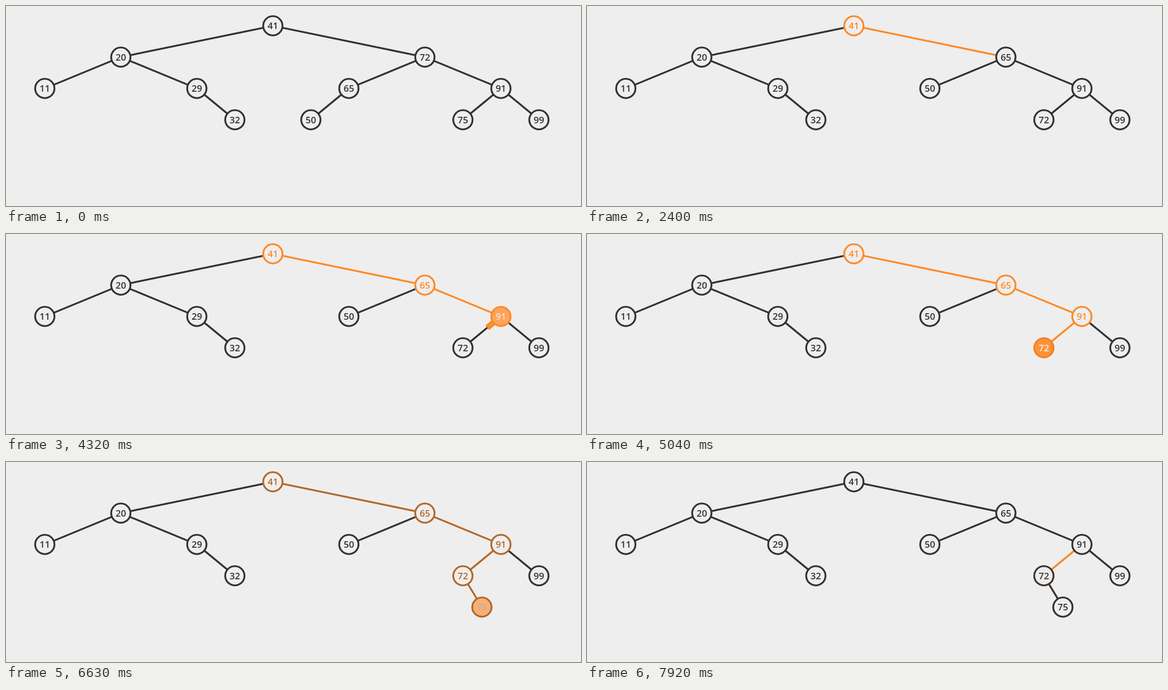
Animation of 1144x399 px, one loop 8000 ms. Source, as an HTML page:

```html
<!DOCTYPE html>
<html lang="en">
<head>
<meta charset="utf-8">
<title>Binary search tree insertion</title>
<style>
  html, body { margin: 0; width: 100%; height: 100%; overflow: hidden; background: #eee; }
  svg { display: block; width: 1144px; height: 399px; }
  text { font: 600 18.4px "Open Sans", "Noto Sans", sans-serif; text-anchor: middle; }
</style>
</head>
<body>
<svg id="stage" viewBox="0 0 1144 399"></svg>
<script>
const LOOP = 8000, SWAP = 840, STEP = 500, RESET = 6404, AGAIN = 6961, BACK = 7518;
const R = 19.2, CUT = 20, LINE = 3.7, THICK = 11.8;
const DARK = [51, 51, 51], ORANGE = [255, 138, 39], BG = [238, 238, 238], WHITE = [255, 255, 255];

const stage = document.getElementById('stage');
const clamp = v => Math.min(1, Math.max(0, v));
const ease = p => p < 0.5 ? 4 * p ** 3 : 1 - 4 * (1 - p) ** 3;
const mix = (a, b, k) => a.map((v, i) => v + (b[i] - v) * k);
const rgb = c => `rgb(${c.map(Math.round)})`;

function make(tag, attrs, parent) {
  const el = document.createElementNS('http://www.w3.org/2000/svg', tag);
  set(el, attrs);
  parent.appendChild(el);
  return el;
}

function set(el, attrs) {
  for (const k in attrs) el.setAttribute(k, attrs[k]);
}

// Eased colour changes, each given as [start, colour, duration]
function track(t, colour, steps) {
  for (const [at, to, dur = STEP] of steps) {
    const p = clamp((t - at) / dur);
    if (p > 0) colour = mix(colour, to, ease(p));
  }
  return rgb(colour);
}

// Nodes: key, column, level, parent key
const shared = [[41, 6, 0], [20, 2, 1, 41], [11, 0, 2, 20], [29, 4, 2, 20], [32, 5, 3, 29]];
const before = [...shared, [72, 10, 1, 41], [65, 8, 2, 72], [50, 7, 3, 65],
  [91, 12, 2, 72], [75, 11, 3, 91], [99, 13, 3, 91]];
const after = [...shared, [65, 10, 1, 41], [50, 8, 2, 65], [91, 12, 2, 65],
  [72, 11, 3, 91], [99, 13, 3, 91], [75, 11.5, 4, 72]];

// Visited nodes: when each lights up, and when the walk leaves it
const visits = {
  41: [1333, 1890], 65: [2448, 3005], 91: [3563, 4120], 72: [4678, 5300], 75: [5833, RESET]
};

function build(list) {
  const g = make('g', {}, stage);
  const lines = make('g', { fill: 'none' }, g), discs = make('g', {}, g);
  const nodes = {};
  for (const [key, col, level, up] of list) {
    const n = { key, x: 77.2 + 75.62 * col, y: 39.5 + 62.5 * level, up: nodes[up] };
    nodes[key] = n;
    if (n.up) {
      n.line = make('path', { stroke: rgb(DARK), 'stroke-width': LINE, d: span(n, 1, CUT) }, lines);
    }
    n.disc = make('circle', { cx: n.x, cy: n.y, r: R, fill: rgb(BG), stroke: rgb(DARK), 'stroke-width': 3.6 }, discs);
    n.label = make('text', { x: n.x, y: n.y + 6.5, fill: rgb(DARK) }, discs);
    n.label.textContent = key;
  }
  return { g, lines, nodes };
}

// Edge from the parent's rim, drawn up to share k, stopping `gap` short of the child's centre
function span(n, k, gap) {
  const { x, y } = n.up, dx = n.x - x, dy = n.y - y, len = Math.hypot(dx, dy);
  const a = CUT / len, b = a + (1 - gap / len - a) * k;
  return `M${x + dx * a} ${y + dy * a}L${x + dx * b} ${y + dy * b}`;
}

const first = build(before), second = build(after);
const pulse = make('path', { stroke: rgb(ORANGE), 'stroke-width': THICK }, second.lines);

function drawNode(n, t) {
  const [enter, leave] = visits[n.key];
  const ring = [[enter, ORANGE], [RESET, DARK]];
  const fill = [[enter, ORANGE], [leave, BG]];
  const text = [[enter, WHITE]];
  if (n.key !== 75) text.push([leave, ORANGE]);
  text.push([RESET, DARK]);
  if (n.key === 72) {
    ring.push([AGAIN, ORANGE], [BACK, DARK]);
    fill.push([AGAIN, ORANGE], [BACK, BG]);
    text.push([AGAIN, WHITE], [BACK, DARK]);
  }
  set(n.disc, { stroke: track(t, n.key === 75 ? ORANGE : DARK, ring), fill: track(t, BG, fill) });
  set(n.label, { fill: track(t, DARK, text) });
}

function drawEdge(n, t) {
  const start = visits[n.up.key][1], p = (t - start) / STEP;
  const steps = [[start + STEP, ORANGE, 1], [RESET, DARK]];
  if (n.key === 72) steps.push([BACK, ORANGE]);
  set(n.line, { stroke: track(t, DARK, steps) });
  if (p > 0 && p < 1) {
    set(pulse, { d: span(n, ease(p), n.key === 75 ? 0 : CUT), visibility: 'visible' });
  }
}

function drawNew(n, t) {
  const start = visits[72][1], grow = ease(clamp((t - visits[75][0]) / STEP));
  set(n.line, { d: span(n, 1, CUT * grow), visibility: t < start + STEP ? 'hidden' : 'visible' });
  set(n.disc, { r: R * grow, 'stroke-width': 3.6 * grow });
  set(n.label, { visibility: t < start ? 'hidden' : 'visible' });
}

function render(t) {
  const late = t >= SWAP;
  first.g.style.display = late ? 'none' : '';
  second.g.style.display = late ? '' : 'none';
  if (!late) return;
  set(pulse, { visibility: 'hidden' });
  for (const key in visits) {
    const n = second.nodes[key];
    drawNode(n, t);
    if (n.up) drawEdge(n, t);
  }
  drawNew(second.nodes[75], t);
}

function tick() {
  render(performance.now() % LOOP);
  requestAnimationFrame(tick);
}
tick();
</script>
</body>
</html>
```
